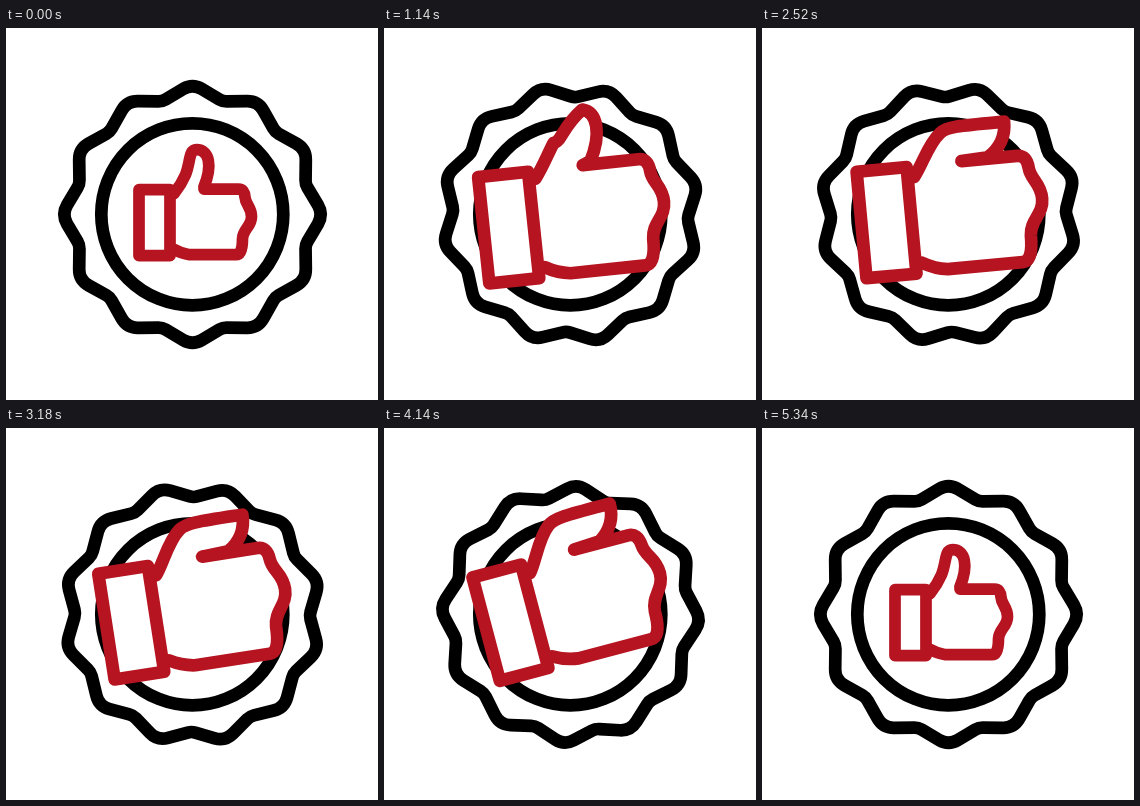
An HTML page that plays this animation: 372 px wide and 372 px high, repeating every 5400 ms.

```html
<!DOCTYPE html>
<html lang="en">
<head>
<meta charset="utf-8">
<title>Thumbs-up badge</title>
<style>
  html, body { margin: 0; width: 100%; height: 100%; overflow: hidden; background: #fff; }
  svg { display: block; width: 100%; height: 100%; }
  path, circle { fill: #fff; stroke: #000; stroke-width: 12.7; stroke-linecap: round; stroke-linejoin: round; }
  #hand path { stroke: #b51420; stroke-width: inherit; }
</style>
</head>
<body>
<svg viewBox="0 0 372 372">
  <path id="badge"/>
  <circle cx="186.3" cy="186.3" r="91"/>
  <g id="hand">
    <path id="palm"/>
    <path d="M-15.5-33h31v66h-31z"/>
  </g>
</svg>
<script>
const LOOP = 5400, STEP = 30, BEGIN = 180, END = 5280;
const CENTER = 186.5, LOBES = 12;
const [badge, hand, palm] = ['badge', 'hand', 'palm'].map(id => document.getElementById(id));

const mix = (a, b, k) => a + (b - a) * k;
const mixPoint = (p, q, k) => p.map((v, i) => mix(v, q[i], k));
const smooth = k => {
  k = Math.min(1, Math.max(0, k));
  return k * k * (3 - 2 * k);
};

const poses = [
  { at: BEGIN, spin: 0, tilt: 0, fold: 0 },
  { at: 1140, spin: 47, tilt: -6, fold: 0.3 },
  { at: 2100, spin: 84.3, tilt: 4.3, fold: 1 },
  { at: 2520, spin: 103.6, tilt: -5.3, fold: 1 },
  { at: 3180, spin: 135.5, tilt: -8.8, fold: 1 },
  { at: 4140, spin: 182.7, tilt: -14.8, fold: 1 },
  { at: END, spin: 240, tilt: 0, fold: 0 }
];

function poseAt(time) {
  const t = Math.min(END, Math.max(BEGIN, time));
  const i = poses.findIndex((p, n) => n && t <= p.at);
  const a = poses[i - 1], b = poses[i];
  const k = (t - a.at) / (b.at - a.at);
  return {
    spin: mix(a.spin, b.spin, k),
    tilt: mix(a.tilt, b.tilt, smooth(k)),
    fold: mix(a.fold, b.fold, smooth(k)),
    grow: smooth((t - BEGIN) / 570) * smooth((END - t) / 720)
  };
}

// Alternating peaks and valleys with softened corners
function badgePath() {
  const point = i => {
    const a = i * Math.PI / LOBES, r = i % 2 ? 117 : 131;
    return [r * Math.sin(a), -r * Math.cos(a)];
  };
  let d = '';
  for (let i = 0; i < 2 * LOBES; i++) {
    const p = point(i), cut = i % 2 ? 0.11 : 0.31;
    d += `${i ? 'L' : 'M'}${mixPoint(p, point(i - 1), cut)}Q${p} ${mixPoint(p, point(i + 1), cut)}`;
  }
  return d + 'Z';
}

// Start point and three cubic segments: back, tip, underside
const thumbUp = [
  [19.5, -29], [25, -36], [28, -41], [31, -48],
  [36, -60], [34, -73], [42, -73],
  [55, -73], [58, -57], [49.5, -36]
];
const thumbFolded = [
  [19.5, -26.5], [25, -33], [30, -46], [38, -52],
  [42.5, -55.8], [52, -55.5], [78, -55.4],
  [78, -47], [75, -40], [66, -34.5]
];
const fist = 'L49.5-33.6H84Q90-33.6 90.5-25.5C91-18 97-16 97-6C97 4 88.5 6 88 16Q88 32 81.5 32H35Q27 31 19.5 26.6';

function palmPath(fold) {
  const points = thumbUp.map((p, i) => mixPoint(p, thumbFolded[i], fold));
  // Halfway through the fold the back of the thumb straightens
  const dip = 45 * fold * (1 - fold);
  points[4][1] += dip;
  points[5][1] += dip;
  return `M${points[0]}C${points.slice(1).join(' ')}${fist}`;
}

function draw(t) {
  const { spin, tilt, fold, grow } = poseAt(t);
  const scale = 1 + 0.62 * grow;
  const x = 148.5 - 25 * grow - 0.2 * tilt;
  const y = 194.7 + 7 * grow * (1 - fold);
  badge.setAttribute('transform', `translate(${CENTER} ${CENTER}) rotate(${spin})`);
  hand.setAttribute('transform', `translate(${x} ${y}) rotate(${tilt}) scale(${scale})`);
  hand.setAttribute('stroke-width', (11.7 + grow) / scale);
  palm.setAttribute('d', palmPath(fold));
}

badge.setAttribute('d', badgePath());
const start = performance.now();
function tick() {
  const t = (performance.now() - start) % LOOP;
  draw(t - t % STEP);
  requestAnimationFrame(tick);
}
tick();
</script>
</body>
</html>
```
